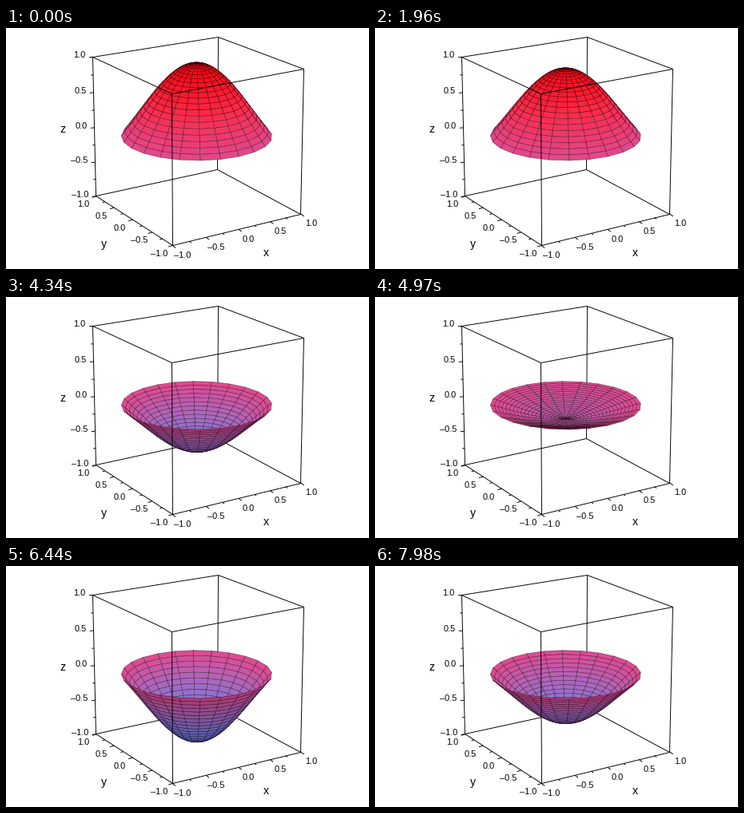
These frames come from a looping animation (454x302 px, 8000 ms). A matplotlib script:

```python
import numpy as np
import matplotlib.pyplot as plt
from matplotlib.animation import FuncAnimation
from matplotlib.collections import LineCollection, PolyCollection

W, H, DPI = 454, 302, 100
LOOP, INTERVAL = 8000, 20
PX = 72 / DPI
PERIOD = 8.466            # oscillation period, in steps
ROOT = 2.4048             # first zero of J0
RINGS, SECTORS = 20, 24
TO_VIEWER = np.array([-0.51, -0.80, 0.32])

# Screen positions of the cube corners
CORNERS = {
    (-1, -1, -1): (208, 272), (1, -1, -1): (368, 233),
    (-1, 1, -1): (112, 210), (1, 1, -1): (264, 177),
    (-1, -1, 1): (207, 82), (1, -1, 1): (372, 51),
    (-1, 1, 1): (108, 36), (1, 1, 1): (265, 11),
}


def fit_camera():
    rows = []
    for point, (u, v) in CORNERS.items():
        p = np.array([*point, 1.0])
        zero = np.zeros(4)
        rows.append([*p, *zero, *(-(u - 239) / 100 * p)])
        rows.append([*zero, *p, *(-(v - 135) / 100 * p)])
    return np.linalg.svd(np.array(rows))[2][-1].reshape(3, 4)


CAMERA = fit_camera()


def project(points):
    points = np.asarray(points, float)
    h = points @ CAMERA[:, :3].T + CAMERA[:, 3]
    return h[..., :2] / h[..., 2:] * 100 + (239, 135)


def j0(x):
    t = np.arange(40) * 2 * np.pi / 40
    return np.cos(np.asarray(x)[..., None] * np.sin(t)).mean(-1)


radius, angle = np.meshgrid(np.linspace(0, 1, RINGS + 1),
                            np.linspace(0, 2 * np.pi, SECTORS + 1), indexing="ij")
X, Y = radius * np.cos(angle), radius * np.sin(angle)
MODE = j0(ROOT * radius)

LEVELS = [-1, -0.65, -0.3, 0, 0.5, 1]
SHADES = np.array([(85, 135, 250), (125, 122, 220), (178, 100, 185),
                   (226, 72, 142), (252, 42, 70), (250, 4, 12)]) / 255


def quads(grid):
    return np.stack([grid[:-1, :-1], grid[1:, :-1], grid[1:, 1:], grid[:-1, 1:]],
                    axis=2).reshape(-1, 4, grid.shape[-1])


def membrane(step):
    z = np.cos(2 * np.pi * step / PERIOD) * MODE
    cells = quads(np.stack([X, Y, z], axis=-1))
    flat = project(cells)
    center = cells.mean(axis=1)
    color = np.stack([np.interp(center[:, 2], LEVELS, SHADES[:, i])
                      for i in range(3)], axis=1)
    a, b = flat[:, 2] - flat[:, 0], flat[:, 3] - flat[:, 1]
    underside = a[:, 0] * b[:, 1] - a[:, 1] * b[:, 0] > 0
    color[underside] *= 0.78
    order = np.argsort(center @ TO_VIEWER)
    return flat[order], color[order]


fig = plt.figure(figsize=(W / DPI, H / DPI), dpi=DPI, facecolor="white")
ax = fig.add_axes([0, 0, 1, 1])
ax.set_xlim(-0.5, W - 0.5)
ax.set_ylim(H - 0.5, -0.5)
ax.axis("off")


def add_lines(segments, zorder):
    ax.add_collection(LineCollection(segments, colors="black",
                                     linewidths=0.95 * PX, zorder=zorder))


def label(x, y, text, size=11, ha="center"):
    ax.text(x, y, text, fontsize=size * PX, family="Liberation Sans",
            ha=ha, va="center_baseline", zorder=5)


def draw_box():
    back, front = [], []
    for p in CORNERS:
        for axis in range(3):
            if p[axis] == -1:
                q = list(p)
                q[axis] = 1
                hidden = (p[:2] == (1, 1) or tuple(q[:2]) == (1, 1)
                          or (p[2] == -1 and axis < 2))
                (back if hidden else front).append([CORNERS[p], CORNERS[tuple(q)]])
    add_lines(back, 1)
    add_lines(front, 3)


def draw_axis(place, tick, offset, ha):
    marks = []
    for i, value in enumerate(np.linspace(-1, 1, 9)):
        start = project(place(value))
        major = i % 2 == 0
        marks.append([start, start + np.array(tick) * (1 if major else 0.6)])
        if major:
            text = f"{value:.1f}".replace("-", "\u2013")
            label(*(start + offset), text, ha=ha)
    add_lines(marks, 3)


draw_box()
draw_axis(lambda v: (-1, 1, v), (-5, 0.5), (-9, -3), "right")
draw_axis(lambda v: (-1, v, -1), (-5, 1.5), (-16, 9.5), "center")
draw_axis(lambda v: (v, -1, -1), (4, 3), (13, 11.5), "center")
label(324.5, 280.5, "x", 14)
label(121.5, 269.5, "y", 14)
label(70.5, 125, "z", 14)

surface = PolyCollection([], edgecolors=(0.1, 0, 0.05, 0.6),
                         linewidths=0.55 * PX, zorder=2)
ax.add_collection(surface)

# Every sixteenth step is held a little longer
holds = [280 if k % 16 == 0 else 210 for k in range(37)]
STARTS = np.concatenate([[0], np.cumsum(holds)])
POSES = [membrane(step) for step in range(len(STARTS))]


def update(frame):
    time = frame * INTERVAL + INTERVAL / 2
    step = np.searchsorted(STARTS, time, side="right") - 1
    cells, color = POSES[step]
    surface.set_verts(cells)
    surface.set_facecolor(color)
    return [surface]


anim = FuncAnimation(fig, update, frames=LOOP // INTERVAL, interval=INTERVAL,
                     repeat=True, repeat_delay=0, blit=False)
plt.show()
```
